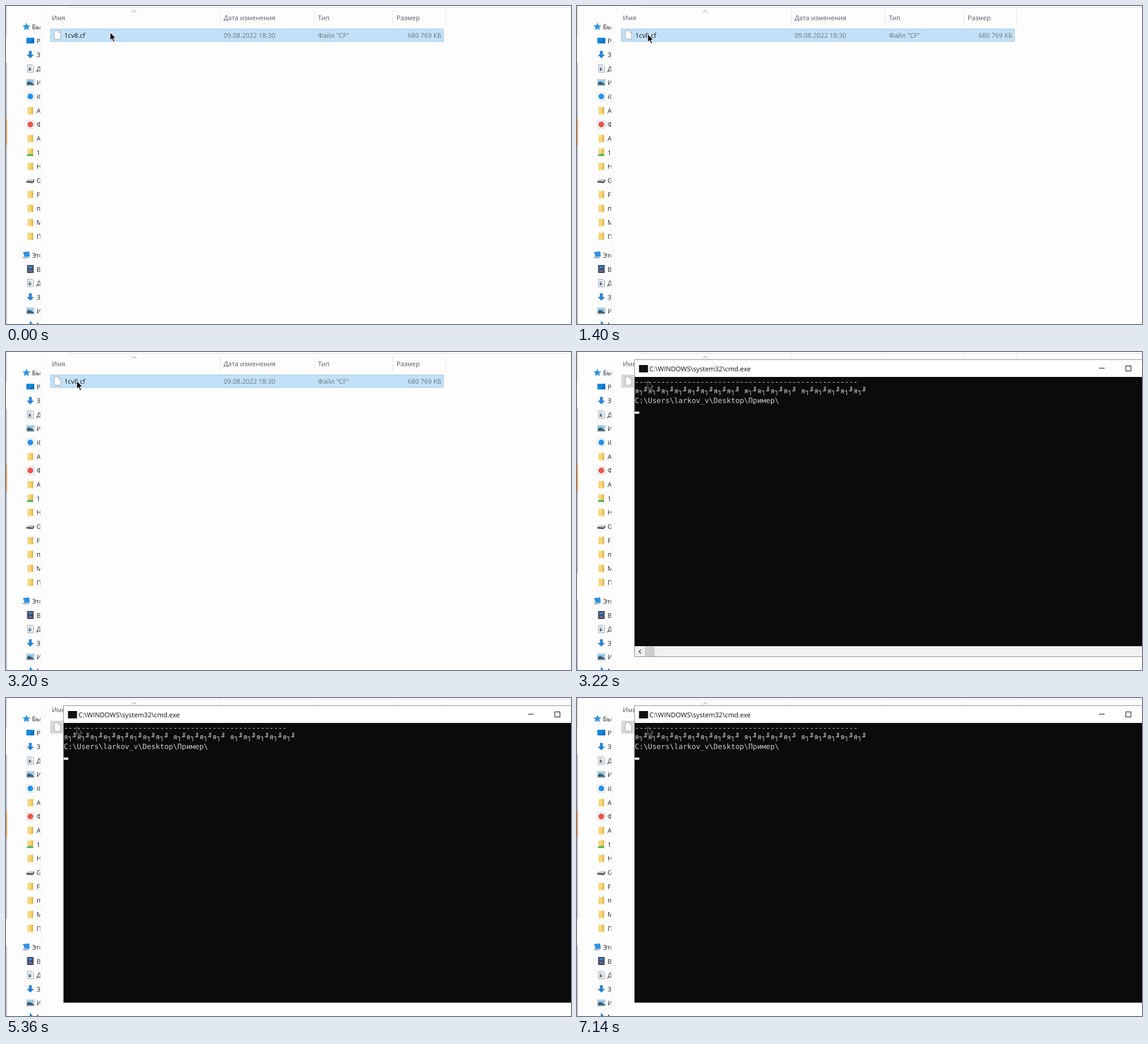
Recreate the animation shown at these times as an HTML page. Size 998 by 561 pixels, loop 8 s.

```html
<!DOCTYPE html>
<html lang="ru">
<head>
<meta charset="utf-8">
<title>Console</title>
<style>
html, body { margin: 0; width: 100%; height: 100%; overflow: hidden; background: #fdfdfd; }
svg { display: block; width: 100%; height: 100%; }
text { font: 11.5px "Open Sans", "Noto Sans", sans-serif; text-rendering: geometricPrecision; white-space: pre; }
.head { fill: #505a68; }
.dim { fill: #6b747c; }
.title { font-size: 11.73px; fill: #111; }
.mono { font: 12.83px "DejaVu Sans Mono", "Noto Sans Mono", monospace; fill: #ccc; }
</style>
</head>
<body>
<svg viewBox="0 0 998 561" xmlns="http://www.w3.org/2000/svg">
  <defs>
    <clipPath id="pane"><rect width="60.5" height="561"/></clipPath>
    <g id="folder">
      <path d="M-5-6H3L5-4V7H-5Z" fill="#f7d67a"/>
      <path d="M2-6H5V7L2 5Z" fill="#e6b94f"/>
    </g>
    <g id="desktop">
      <rect x="-7" y="-5" width="14" height="10" fill="#1687dc"/>
      <path d="M7-5V5H-2Z" fill="#0d6fc2"/>
    </g>
    <path id="down" d="M-2.5-6.5H2.5V0H6.5L0 6.5L-6.5 0H-2.5Z" fill="#2a82d6"/>
    <g id="doc">
      <path d="M-5-6.5H3L5.5-4V6.5H-5Z" fill="#fff" stroke="#8b98a4"/>
      <path d="M-3-3H2M-3 0H3.5M-3 3H3.5" stroke="#6d8598"/>
      <rect x="-3" y="-1" width="3.5" height="5" fill="#54748c"/>
    </g>
    <g id="image">
      <rect x="-7" y="-5.5" width="14" height="11" fill="#fff" stroke="#a7b4be" stroke-width=".8"/>
      <rect x="-6" y="-4.5" width="12" height="5" fill="#8dc4ec"/>
      <path d="M-6 0L-2-2L6 2V4.5H-6Z" fill="#3c5f72"/>
    </g>
    <g id="cloud">
      <rect x="-7" y="-7" width="14" height="14" rx="3" fill="#fff" stroke="#d5d5d5"/>
      <circle r="5" fill="#2492ee"/>
    </g>
    <g id="photos">
      <rect x="-7" y="-7" width="14" height="14" rx="3" fill="#fff" stroke="#cfcfcf"/>
      <circle r="5.2" fill="#e8574d"/>
    </g>
    <g id="shared">
      <use href="#folder" y="-1"/>
      <path d="M-6 5H5M0 2V6" stroke="#3fae58" stroke-width="2.4"/>
    </g>
    <g id="drive">
      <path d="M-7 1L-3-2H7L4 2Z" fill="#c6c9cc"/>
      <path d="M-7 1L4 2L7-2V2L4 5L-7 4Z" fill="#54575a"/>
    </g>
    <g id="video">
      <rect x="-6" y="-7" width="12" height="14" fill="#303844"/>
      <rect x="-3.5" y="-5.5" width="7" height="5" fill="#427fc5"/>
      <rect x="-3.5" y="1" width="7" height="4.5" fill="#6a6590"/>
      <path d="M-5-6V7M5-6V7" stroke="#d7dde3" stroke-dasharray="1.5 1.5"/>
    </g>
    <path id="note" d="M0-6V4M0-6Q1-2 4-1" fill="none" stroke="#1687dc" stroke-width="2"/>
    <path id="star" d="M0-7L2-2.3L7-2L3.2 1.2L4.5 6L0 3.4L-4.5 6L-3.2 1.2L-7-2L-2-2.3Z" fill="#2e92e0"/>
    <g id="pc">
      <path d="M-6-5L5-6L6 3L-3 4Z" fill="#2e92e0"/>
      <path d="M-7 3L-1 5L5 4L3 6L-5 6Z" fill="#8596a3"/>
    </g>
  </defs>

  <rect width="998" height="561" fill="#fdfdfd"/>
  <rect width="2" height="54" fill="#e3e1e3"/>
  <rect y="100" width="2" height="461" fill="#cecbd0"/>
  <rect y="199" width="2" height="47" fill="#f8a25e"/>
  <rect id="gap" y="390" width="2" height="47" fill="#fdfdfd"/>
  <path d="M62.5 0V561" stroke="#f5f5f5"/>
  <g id="side" clip-path="url(#pane)" fill="#222"></g>

  <path d="M110 2.5H998" stroke="#e2e2e2"/>
  <path d="M378.5 7V35M544.5 7V35M683.5 7V35M776.5 7V35" stroke="#e3e3e3"/>
  <path d="M222.5 11.5L226.5 8L230.5 11.5" fill="none" stroke="#8b8b8b"/>
  <g class="head">
    <text x="81" y="25">Имя</text>
    <text x="384.5" y="25">Дата изменения</text>
    <text x="551" y="25">Тип</text>
    <text x="690" y="25">Размер</text>
  </g>
  <rect id="row" x="78.5" y="40.5" width="694" height="22"/>
  <path d="M85.5 43.5H93L96.5 47V58.5H85.5Z" fill="#fff" stroke="#a5a5a5" stroke-width=".9"/>
  <path d="M93 43.5V47H96.5" fill="none" stroke="#a5a5a5" stroke-width=".9"/>
  <text x="103" y="56" fill="#161616">1cv8.cf</text>
  <g class="dim">
    <text x="384.5" y="56">09.08.2022 18:30</text>
    <text x="551" y="56">Файл "CF"</text>
    <text x="769" y="56" text-anchor="end">680 769 КБ</text>
  </g>

  <g id="console">
    <rect x="102" y="14" width="896" height="523" fill="#0b0b0b"/>
    <rect x="102" y="14" width="896" height="30" fill="#fff"/>
    <path d="M998 13.5H101.5V537.5H998" fill="none" stroke="#8e8e8e"/>
    <rect x="109.5" y="23" width="16" height="13" fill="#111"/>
    <text class="title" x="128" y="34">C:\WINDOWS\system32\cmd.exe</text>
    <path d="M922 28.5H932" stroke="#111"/>
    <rect x="969.5" y="24.5" width="9" height="9" fill="none" stroke="#111"/>
    <text class="mono" id="dashes" x="102" y="56.5"></text>
    <text class="mono" id="garble" x="102" y="73"></text>
    <text class="mono" x="102" y="89.5">C:\Users\larkov_v\Desktop\Пример\</text>
    <rect x="102" y="105" width="8" height="4" fill="#f2f2f2"/>
    <g id="scroll">
      <rect x="102" y="519" width="896" height="18" fill="#f0f0f0"/>
      <rect x="120" y="520" width="17" height="17" fill="#cdcdcd"/>
      <path d="M113 525L109.5 528.5L113 532" fill="none" stroke="#444" stroke-width="1.4"/>
    </g>
  </g>
  <path id="arrow" d="M0 0V14.2L3.3 11.2L5.8 17L8.1 16L5.7 10.4H10Z" stroke-width="1" stroke-linejoin="round"/>
</svg>
<script>
const $ = id => document.getElementById(id);
const LOOP = 8000, OPEN = 3220, SCROLL_END = 3240;

const entry = (icon, label, y, ix = 43, tx = 54) =>
  `<use href="#${icon}" x="${ix}" y="${y}"/><text x="${tx}" y="${y + 4.5}">${label}</text>`;

const quick = [
  ['desktop', 'Р'], ['down', 'З'], ['doc', 'Д'], ['image', 'И'], ['cloud', 'iC'],
  ['folder', 'А'], ['photos', 'Ф'], ['folder', 'А'], ['shared', '1'], ['folder', 'Н'],
  ['drive', 'G'], ['folder', 'F'], ['folder', 'п'], ['folder', 'М'], ['folder', 'П']
];
const computer = [
  ['video', 'В'], ['doc', 'Д'], ['down', 'З'], ['image', 'И'], ['note', 'М']
];
const list = (items, top) => items.map(([icon, label], i) => entry(icon, label, top + 24.65 * i)).join('');

$('side').innerHTML =
  entry('star', 'Быстрый', 36.5, 36, 46) + list(quick, 61) +
  entry('pc', 'Этот', 439, 36, 46) + list(computer, 464);

$('dashes').textContent = '-'.repeat(51);
$('garble').textContent = [8, 4, 5].map(n => 'я┐╜'.repeat(n)).join(' ');

// time, x, y of the pointer tip
const path = [
  [20, 184, 46.5], [560, 125, 49.5], [1400, 125, 49.5],
  [1980, 124.5, 50], [2800, 124.5, 50], [3200, 125, 51]
];
const ease = u => u * u * (3 - 2 * u);

function pointer(t) {
  if (t <= path[0][0]) return path[0].slice(1);
  for (let i = 1; i < path.length; i++) {
    const [t0, x0, y0] = path[i - 1], [t1, x1, y1] = path[i];
    if (t < t1) {
      const k = ease((t - t0) / (t1 - t0));
      return [x0 + (x1 - x0) * k, y0 + (y1 - y0) * k];
    }
  }
  return path[path.length - 1].slice(1);
}

const show = (id, on) => $(id).setAttribute('visibility', on ? 'visible' : 'hidden');

function draw(t) {
  const open = t >= OPEN;
  show('console', open);
  show('gap', open);
  show('scroll', open && t < SCROLL_END);
  $('row').setAttribute('fill', open ? '#d9d9d9' : '#c2e0f7');
  $('row').setAttribute('stroke', open ? '#d9d9d9' : '#9bcbee');
  $('arrow').setAttribute('fill', open ? '#0b0b0b' : '#000');
  $('arrow').setAttribute('stroke', open ? '#858585' : '#fff');
  $('arrow').setAttribute('transform', `translate(${pointer(t)})`);
}

const start = performance.now();
function tick() {
  draw((performance.now() - start) % LOOP);
  requestAnimationFrame(tick);
}
draw(0);
requestAnimationFrame(tick);
</script>
</body>
</html>
```
